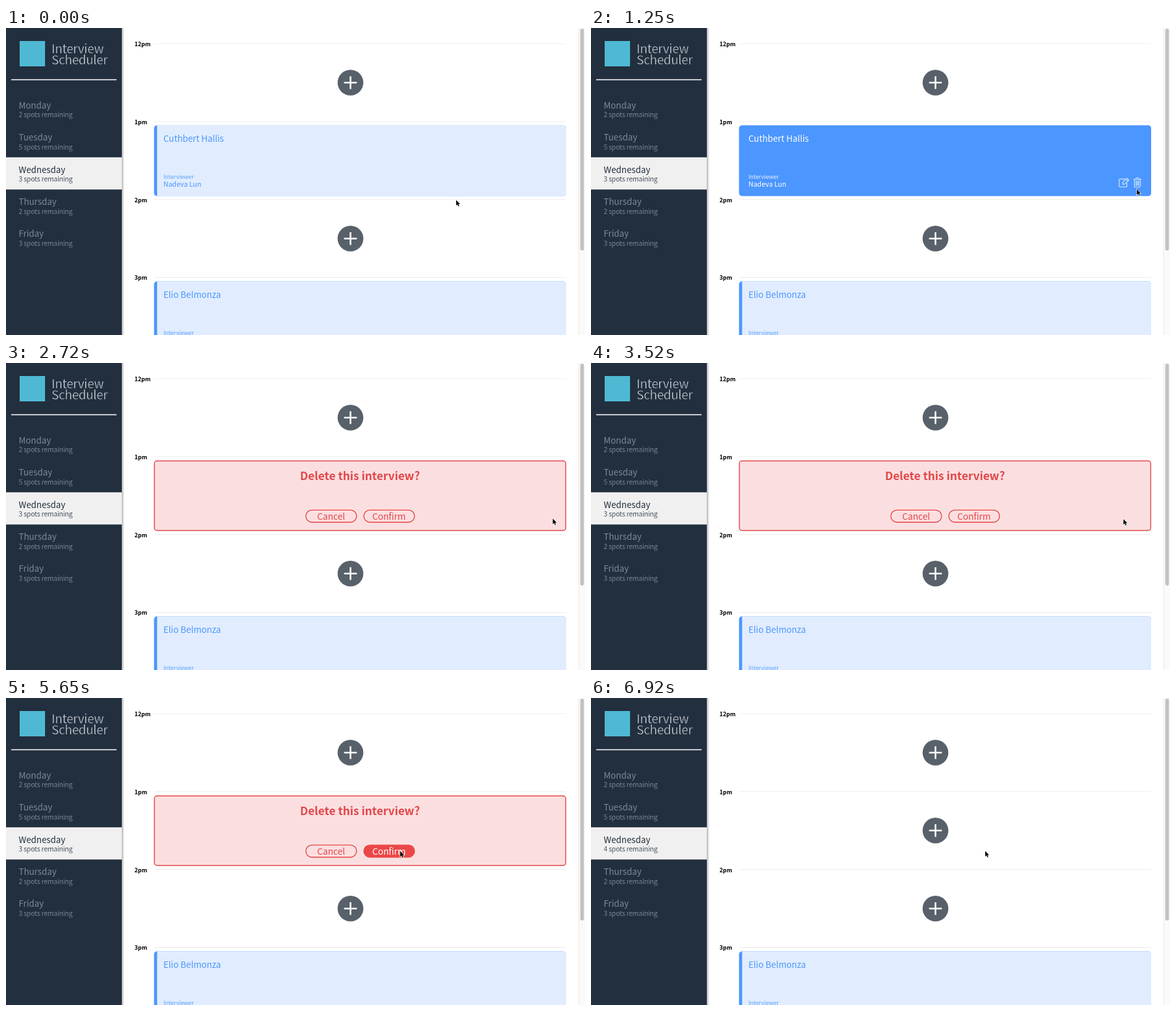
Write an HTML page that moves like this. It is 890 px wide and 472 px high and loops after 6990 ms.

```html
<!DOCTYPE html>
<html lang="en">
<head>
<meta charset="utf-8">
<title>Interview Scheduler</title>
<style>
  html, body { margin: 0; width: 100%; height: 100%; overflow: hidden; background: #fff; }
  svg { display: block; width: 100%; height: 100%; }
  text { font-family: "Noto Sans CJK JP", "Noto Sans CJK SC", "Noto Sans CJK", "Noto Sans", sans-serif; white-space: pre; }
  .brand { font-size: 19px; letter-spacing: -.38px; fill: #d3d9e0; stroke: #222f3e; stroke-width: .45px; }
  .day { font-size: 13.3px; fill: #7b899b; }
  .spots { font-size: 10.5px; letter-spacing: -.24px; fill: #8c9aab; stroke: #222f3e; stroke-width: .2px; }
  .selected .day { fill: #222f3e; }
  .selected .spots { fill: #222f3e; stroke: #f0f0f0; }
  .time { font-size: 8.85px; font-weight: 700; }
  .name { font-size: 13.3px; }
  .label { font-size: 9px; letter-spacing: -.13px; opacity: .85; }
  .who { font-size: 10.6px; }
  .card { fill: #4b96ff; }
  .card .face { fill: #e1edfe; }
  .card.hover { fill: #fff; }
  .card.hover .face { fill: #4b96ff; }
  .icon { fill: none; stroke: #fff; stroke-width: 1.4; stroke-linejoin: round; stroke-linecap: round; }
  .title { font-size: 17.25px; font-weight: 700; text-anchor: middle; fill: #e3474a; }
  .button { fill: #e3474a; font-size: 13.7px; text-anchor: middle; }
  .button rect { fill: none; stroke: #e3474a; stroke-width: 1.4; }
  .button.hover { fill: #fff; }
  .button.hover rect { fill: #ec4748; stroke: #ec4748; }
</style>
</head>
<body>
<svg viewBox="0 0 890 472">
  <defs>
    <linearGradient id="shade">
      <stop offset="0" stop-color="#000" stop-opacity=".3"/>
      <stop offset="1" stop-color="#000" stop-opacity="0"/>
    </linearGradient>
    <g id="add">
      <circle r="19.8" fill="#58616a"/>
      <path d="M-9.8 0H9.8M0 -9.8V9.8" stroke="#fff" stroke-width="2.5"/>
    </g>
  </defs>

  <rect width="890" height="472" fill="#fff"/>
  <rect x="178" width="4" height="472" fill="url(#shade)"/>
  <rect width="178" height="472" fill="#222f3e"/>
  <rect x="21" y="20" width="39" height="39" fill="#4fb9d3"/>
  <text class="brand" x="70" y="38.5">Interview</text>
  <text class="brand" x="70" y="56">Scheduler</text>
  <path d="M8 79.5H170" stroke="#fff" stroke-width="1.4"/>
  <g id="days"></g>

  <g id="hours"></g>
  <use href="#add" x="529.5" y="84"/>
  <use href="#add" x="529.5" y="323.7"/>

  <g id="booked" class="card">
    <rect x="227.5" y="149.8" width="633.5" height="108.4" rx="4.5" fill="#4b96ff"/>
    <path class="face" d="M232.3 149.8H856.5a4.5 4.5 0 0 1 4.5 4.5V253.7a4.5 4.5 0 0 1 -4.5 4.5H232.3Z"/>
    <text class="name" x="242" y="175">Cuthbert Hallis</text>
    <text class="label" x="242" y="232">Interviewer</text>
    <text class="who" x="242" y="244">Nadeva Lun</text>
    <g id="icons">
      <path class="icon" opacity=".65" d="M820.5 232.3H813.2Q811.8 232.3 811.8 233.7V243Q811.8 244.4 813.2 244.4H822.3Q823.7 244.4 823.7 243V239.3M817.2 239.8L817.6 237L823.8 230.9L826.9 233.9L820.4 240L817.2 240.3ZM822.3 232.4L825.4 235.4"/>
      <path id="trash" class="icon" d="M834 232.6H845.8M837.3 232.4L838.3 230.4H841.5L842.5 232.4M835.4 232.8V243.2Q835.4 244.6 836.8 244.6H843Q844.4 244.6 844.4 243.2V232.8M838 235.3V242M839.9 235.3V242M841.8 235.3V242"/>
    </g>
  </g>

  <g id="confirm">
    <rect x="228.1" y="150.5" width="632.3" height="107" rx="4" fill="#fbdfe0" stroke="#e3474a" stroke-width="1.4"/>
    <text class="title" x="544.2" y="180">Delete this interview?</text>
    <g class="button">
      <rect x="460.9" y="226.1" width="78" height="18.6" rx="9.3"/>
      <text x="499.8" y="240.5">Cancel</text>
    </g>
    <g id="yes" class="button">
      <rect x="550" y="226.1" width="78" height="18.6" rx="9.3"/>
      <text x="588.7" y="240.5">Confirm</text>
    </g>
  </g>

  <g id="deleting">
    <rect x="227.5" y="149.8" width="633.5" height="108.4" rx="4.5" fill="#222f3e"/>
    <g fill="none" stroke="#fff" stroke-width="2.6">
      <circle cx="498.8" cy="204" r="13.6" stroke-opacity=".2"/>
      <path id="arc" d="M489.18 194.38A13.6 13.6 0 0 0 489.18 213.62"/>
    </g>
    <text x="533" y="210.8" font-size="17.4" font-weight="700" fill="#fff">Deleting</text>
  </g>

  <use id="free" href="#add" x="529.5" y="203.8"/>

  <g class="card" transform="translate(0 239.8)">
    <rect x="227.5" y="149.8" width="633.5" height="108.4" rx="4.5"/>
    <path class="face" d="M232.3 149.8H856.5a4.5 4.5 0 0 1 4.5 4.5V258H232.3Z"/>
    <text class="name" x="242" y="175">Elio Belmonza</text>
    <text class="label" x="242" y="232">Interviewer</text>
  </g>

  <rect x="880.5" width="9.5" height="472" fill="#fafafa"/>
  <path d="M880.5 0V472" stroke="#e9e9e9"/>
  <rect x="882.8" y="1" width="5.6" height="341" rx="2.8" fill="#c1c1c1"/>

  <g id="cursor">
    <path id="arrow" d="M0 0V8.6L2 6.8L3.3 9.8L4.7 9.2L3.4 6.3H6Z" fill="#000" stroke="#fff" stroke-width="1.2" paint-order="stroke"/>
    <path id="hand" d="M-.9 .8Q0 -.5 .9 .8V4L4.6 4.9Q5.6 5.2 5.3 6.6L4.5 10.6H-.4L-3.3 7Q-3.2 5.6 -.9 6.8Z" fill="#fff" stroke="#111" stroke-width=".8" stroke-linejoin="round"/>
  </g>
</svg>
<script>
  const LOOP = 6990;
  const ENTER = 270, TRASH = 1480, ASK = 2480, REMOVE = 5750, DONE = 6820;
  const SPIN = 1100;

  // time, x, y of the pointer tip
  const path = [
    [0, 692, 264.5], [120, 692, 264.5], [450, 752, 249], [820, 832, 248], [1050, 839, 248],
    [1350, 839, 248], [1560, 840.5, 238.8], [3380, 840.5, 239.5], [3520, 819, 240],
    [3650, 746, 239], [3950, 640, 237], [4300, 606, 235.6], [LOOP, 606, 235.2]
  ];

  const el = id => document.getElementById(id);
  const show = (id, on) => el(id).setAttribute("display", on ? "inline" : "none");

  const days = [["Monday", 2], ["Tuesday", 5], ["Wednesday", 3], ["Thursday", 2], ["Friday", 3]];
  el("days").innerHTML = days.map(([day, spots], i) => {
    const y = 49.45 * i, on = i === 2;
    return `<g class="${on ? "selected" : ""}">
      ${on ? '<rect y="198.8" width="178" height="49.5" fill="#f0f0f0"/>' : ""}
      <text class="day" x="19.5" y="${123.6 + y}">${day}</text>
      <text class="spots" x="19.5" y="${137.2 + y}">${spots} spots remaining</text></g>`;
  }).join("");
  const count = document.querySelector(".selected .spots");

  el("hours").innerHTML = ["12pm", "1pm", "2pm", "3pm"].map((hour, i) => {
    const y = 119.85 * i;
    return `<text class="time" x="197.5" y="${27.9 + y}">${hour}</text>
      <path d="M227.5 ${24 + y}H861" stroke="#ededed"/>`;
  }).join("");

  function pointer(t) {
    const i = path.findIndex(p => p[0] > t);
    const [t0, x0, y0] = path[i - 1], [t1, x1, y1] = path[i];
    const k = (t - t0) / (t1 - t0);
    return [x0 + (x1 - x0) * k, y0 + (y1 - y0) * k];
  }

  function draw() {
    const t = performance.now() % LOOP;
    const [x, y] = pointer(t);
    const onTrash = t >= TRASH && t < ASK;

    show("booked", t < ASK);
    show("confirm", t >= ASK && t < REMOVE);
    show("deleting", t >= REMOVE && t < DONE);
    show("free", t >= DONE);

    el("booked").classList.toggle("hover", t >= ENTER);
    show("icons", t >= ENTER);
    el("trash").setAttribute("opacity", onTrash ? 1 : .65);
    el("yes").classList.toggle("hover", x < 628);
    el("arc").setAttribute("transform", `rotate(${315 + (t - 6650) / SPIN * 360} 498.8 204)`);
    count.textContent = `${t < DONE ? 3 : 4} spots remaining`;

    el("cursor").setAttribute("transform", `translate(${x} ${y})`);
    show("arrow", !onTrash);
    show("hand", onTrash);
    requestAnimationFrame(draw);
  }
  draw();
</script>
</body>
</html>
```
